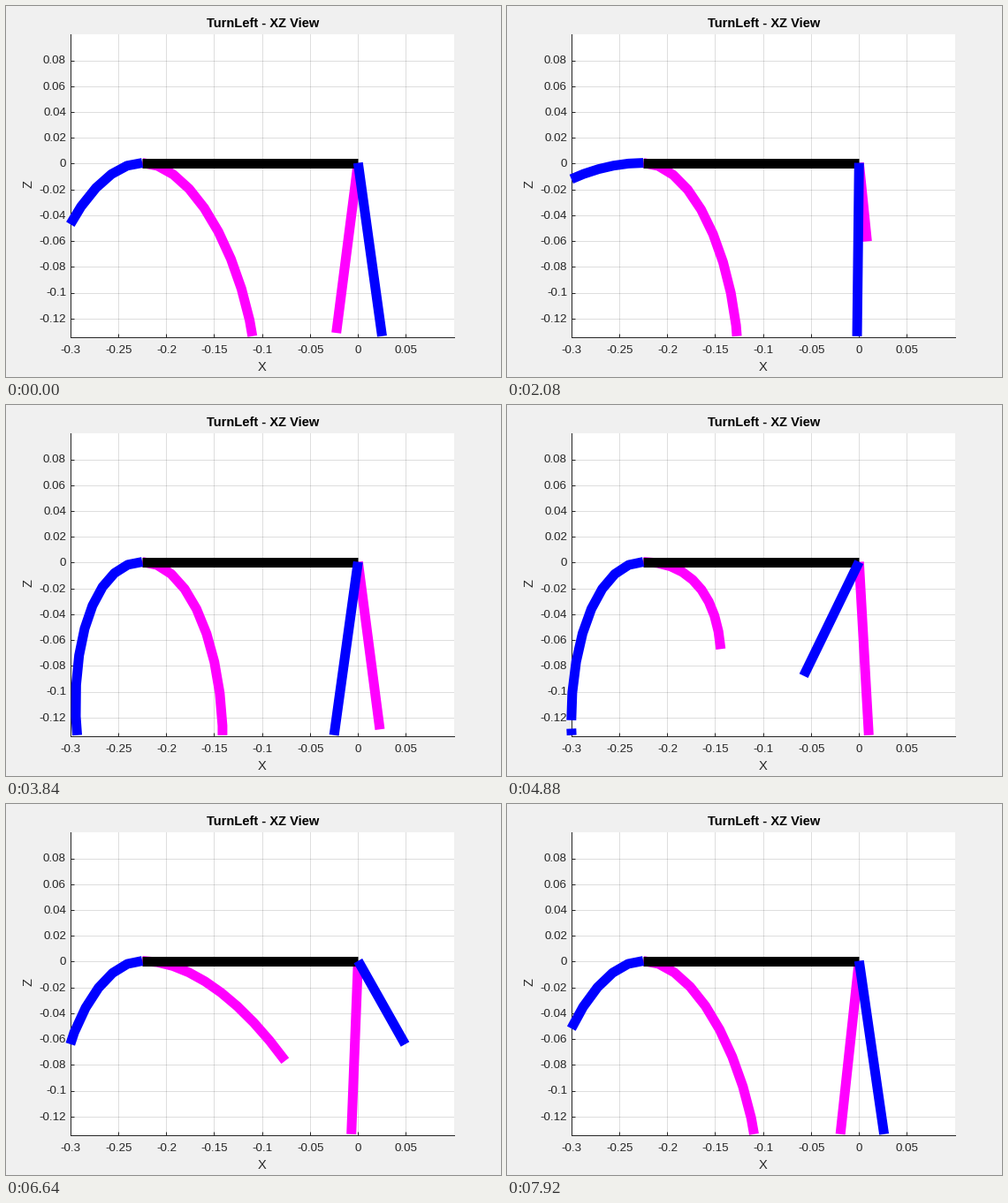
A matplotlib script that plays this animation: 560 by 420 pixels, repeating every 8 s.

```python
import numpy as np
import matplotlib.pyplot as plt
from matplotlib.animation import FuncAnimation
from matplotlib.transforms import ScaledTranslation

W, H, DPI = 560, 420, 100
PX = 72 / DPI                    # points per pixel
FRAMES, STEP = 100, 80
X_MIN, X_MAX, Z_MIN, Z_MAX = -0.3, 0.1, -0.1343, 0.1
BODY = 0.225
LIMB, SEGMENTS = 0.2325, 9       # rear limb length and pieces
REACH, SIDE = 0.6, 0.8           # rear hip direction in x and y
FLOOR, CLEARANCE = 0.1365, 0.076
STANCE_BEND = 1.665
HALF = FRAMES // 2
INK = "#262626"

plt.rcParams["font.family"] = "Liberation Sans"


def gait(i, start, stride, kick, mid=0, lean=0, skew=0.13):
    """Sway along x and lift (0 to 1): half a cycle in the air, half on the floor."""
    q = (i - start + 1) % FRAMES / HALF
    if q > 1:
        return mid + stride * (3 - 2 * q), 0
    lift = np.sin(np.pi * (q - skew * q * np.sin(np.pi * q)))
    sway = -stride * np.cos(np.pi * q) - kick * np.sin(2 * np.pi * q)
    return mid + sway - lean * lift, lift


def front_limb(i, start, stride, kick):
    x, lift = gait(i, start, stride, kick)
    return np.array([(0, 0), (x, CLEARANCE * lift - FLOOR)])


def rear_limb(i, side, dip, *step):
    """Constant-curvature arc seen from the side."""
    swing, lift = gait(i, *step)
    bend = STANCE_BEND - dip * lift
    a = np.linspace(0, bend, SEGMENTS + 1)
    radius = LIMB / bend
    drop = 1 - np.cos(a)
    x = side * REACH * np.sin(a) + SIDE * np.sin(swing) * drop
    return np.column_stack([-BODY + radius * x, -radius * np.cos(swing) * drop])


def clip(points):
    """Cut a polyline at the left and lower limits, leaving gaps outside."""
    out = []
    for p, q in zip(points[:-1], points[1:]):
        lo, hi = 0.0, 1.0
        for a, b in zip(p - (X_MIN, Z_MIN), q - (X_MIN, Z_MIN)):
            if a < 0 and b < 0:
                hi = -1
            elif a < 0:
                lo = max(lo, a / (a - b))
            elif b < 0:
                hi = min(hi, a / (a - b))
        if lo < hi:
            if lo > 0:
                out.append((np.nan, np.nan))
            out += [p + lo * (q - p), p + hi * (q - p)]
    return np.array(out).T


fig = plt.figure(figsize=(W / DPI, H / DPI), dpi=DPI, facecolor="#f0f0f0")
ax = fig.add_axes([72.7 / W, 45.35 / H, 434 / W, 342.3 / H])
ax.set(xlim=(X_MIN, X_MAX), ylim=(Z_MIN, Z_MAX))
x_ticks = np.arange(-6, 2) * 0.05
z_ticks = np.arange(-6, 5) * 0.02
ax.set_xticks(x_ticks)
ax.set_yticks(z_ticks)
ax.set_axisbelow(True)
ax.grid(color=INK, alpha=0.15, linewidth=PX)
ax.tick_params(direction="in", length=4 * PX, width=PX, color=INK,
               labelbottom=False, labelleft=False)
for name, spine in ax.spines.items():
    spine.set(visible=name in ("left", "bottom"), color=INK, linewidth=PX, zorder=1)


def label(x, y, text, size=13.33, color=INK, **style):
    style = {"ha": "center", "va": "baseline", **style}
    fig.text(x / W, 1 - y / H, text, fontsize=size * PX, color=color, **style)


for v in x_ticks:
    label(73 + (v - X_MIN) * 1085, 393, f"{round(v, 2):g}")
for v in z_ticks:
    label(68, 182.3 - v * 1461, f"{round(v, 2):g}", ha="right")
label(290.5, 24, "TurnLeft - XZ View", 14.67, "black", weight="bold")
label(290, 413, "X", 14.67)
label(25, 201, "Z", 14.67, rotation=90, va="center")

# Limbs sit just above the pixel-snapped grid.
limb_space = ax.transData + ScaledTranslation(0.1 / DPI, 0.85 / DPI,
                                              fig.dpi_scale_trans)


def line(color, order):
    return ax.plot([], [], color=color, lw=11 * PX, zorder=order, clip_on=False,
                   transform=limb_space, solid_capstyle="butt",
                   solid_joinstyle="round")[0]


front_right, rear_right = line("magenta", 3), line("magenta", 3)
line("black", 4).set_data([-BODY, 0], [0, 0])
front_left, rear_left = line("blue", 5), line("blue", 5)


def update(i):
    # Diagonal pairs step together, half a cycle apart.
    front_right.set_data(*clip(front_limb(i, 0, 0.0198, 0.0235)))
    front_left.set_data(*clip(front_limb(i, HALF, 0.0265, 0.0385)))
    rear_left.set_data(*clip(rear_limb(i, -1, 1.29, 0, 0.195, 0.2, -0.02, 0.12, 0.08)))
    rear_right.set_data(*clip(rear_limb(i, 1, 1.22, HALF, 0.147, 0.452, 0.143,
                                        0.384, -0.08)))
    return front_right, rear_right, front_left, rear_left


anim = FuncAnimation(fig, update, frames=FRAMES, interval=STEP, repeat=True)
plt.show()
```
